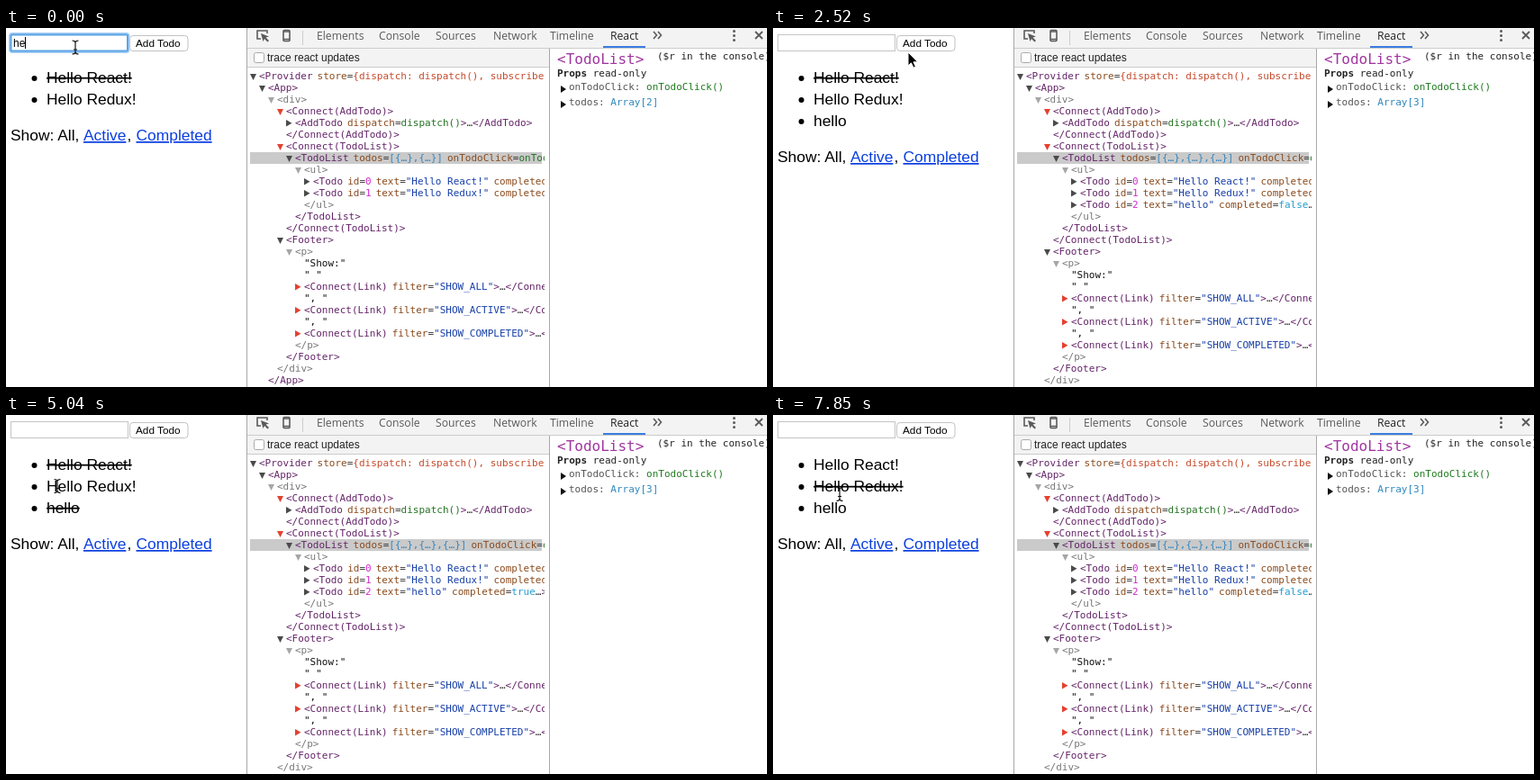
These frames come from a looping animation (845 px wide and 399 px high, 7.99 s). An HTML page:

```html
<!DOCTYPE html>
<html lang="en">
<head>
<meta charset="utf-8">
<title>Todo list with inspector</title>
<style>
  html, body { margin: 0; width: 100%; height: 100%; overflow: hidden; background: #fff; }
  svg { display: block; width: 100vw; height: 100vh; }
  text { white-space: pre; }
  .page { font: 17.4px "Liberation Sans", Arial, sans-serif; fill: #000; }
  .field { font: 12px "Liberation Sans", Arial, sans-serif; }
  .button { font: 11.8px "Liberation Sans", Arial, sans-serif; }
  .tab { font: 12.2px "Open Sans", "Noto Sans", sans-serif; fill: #5a5a5a; }
  .code { font: 11px "DejaVu Sans Mono", monospace; }
  .link { fill: #0b3fe0; text-decoration: underline; }
  .done { text-decoration: line-through; }
</style>
</head>
<body>
<svg id="stage" viewBox="0 0 845 399">
  <defs><clipPath id="treeClip"><rect x="268" y="44" width="330" height="355"/></clipPath></defs>
  <rect width="845" height="399" fill="#fff"/>

  <g id="page" class="page">
    <rect x="5.5" y="7.5" width="130" height="18" fill="#fff" stroke="#c4c4c4"/>
    <g id="focus">
      <rect x="5" y="7" width="130.5" height="19" rx="2" fill="none" stroke="#a9d0f5" stroke-width="4"/>
      <rect x="5.5" y="7.5" width="129.5" height="18" rx="1" fill="#fff" stroke="#5ba3e6" stroke-width="2"/>
      <path id="caret" d="M.5 10V23" stroke="#000"/>
    </g>
    <text id="typed" class="field" x="8" y="21"></text>
    <rect x="137.5" y="8.5" width="64.5" height="17" rx="3.5" fill="#fff" stroke="#c2c2c2"/>
    <text class="button" x="144" y="21">Add Todo</text>
    <g id="items"></g>
    <g id="filters">
      <text x="5" y="125">Show: All,</text>
      <text class="link" x="86" y="125">Active</text>
      <text x="134.5" y="125">,</text>
      <text class="link" x="144.5" y="125">Completed</text>
    </g>
  </g>

  <rect x="268" width="577" height="22" fill="#f3f3f3"/>
  <rect x="268" y="22" width="335" height="21" fill="#f3f3f3"/>
  <path d="M267.5 0V399M603.5 22V399" stroke="#a8a8a8"/>
  <path d="M268 22.5H845M268 43.5H603M329.5 3V19" stroke="#ccc"/>
  <g fill="none" stroke="#5a5a5a" stroke-width="1.6">
    <path d="M283 12H279V3H290V6"/>
    <rect x="308" y="2.5" width="7" height="12" rx="1"/>
    <path d="M308 4H315M308 12.5H315"/>
    <path d="M719 4L722.5 8L719 12M724 4L727.5 8L724 12"/>
    <path d="M832 4L840 12M840 4L832 12" stroke-width="1.8"/>
  </g>
  <path d="M283 6L292 9.5L288.5 10.5L292 14L290.5 15.5L287 12L285.5 15Z" fill="#5a5a5a"/>
  <g fill="#5a5a5a">
    <circle cx="808.5" cy="3.5" r="1.5"/><circle cx="808.5" cy="8.5" r="1.5"/><circle cx="808.5" cy="13.5" r="1.5"/>
  </g>
  <g id="tabs" class="tab"></g>
  <rect x="663" y="20" width="47" height="2" fill="#3b7de0"/>
  <rect x="275.5" y="27.5" width="11" height="11" rx="2" fill="#fff" stroke="#aaa"/>
  <text class="field" x="290" y="37" fill="#222">trace react updates</text>

  <g id="tree" class="code" clip-path="url(#treeClip)"></g>

  <g class="code" fill="#222">
    <text x="612" y="40" fill="#a0369f" style="font-size:16px">&lt;TodoList&gt;</text>
    <text x="723" y="35">($r in the console)</text>
    <text x="612" y="54"><tspan font-weight="bold">Props</tspan> read-only</text>
    <path d="M616 64L622 68L616 72ZM616 81L622 85L616 89Z" fill="#111"/>
    <text x="625" y="69" fill="#555">onTodoClick: <tspan fill="#1f7a1f">onTodoClick()</tspan></text>
    <text x="625" y="86" fill="#555">todos: <tspan id="count" fill="#2f87bd"></tspan></text>
  </g>

  <g id="ibeam" fill="none">
    <path id="beam" d="M-3.5 -7.5Q-.5 -7.5 0 -5.5Q.5 -7.5 3.5 -7.5M0 -6V6M-3.5 7.5Q-.5 7.5 0 5.5Q.5 7.5 3.5 7.5M-2 2.5H2" stroke="#111" stroke-width="1.2"/>
  </g>
  <path id="arrow" d="M0 0V15L3.4 11.8L6 17.2L8.4 16.1L6 10.8H10.8Z" fill="#000" stroke="#fff" stroke-width="1"/>
</svg>
<script>
const LOOP = 7990;
const $ = id => document.getElementById(id);

function add(parent, tag, attrs, content = '') {
  const node = document.createElementNS('http://www.w3.org/2000/svg', tag);
  for (const key in attrs) node.setAttribute(key, attrs[key]);
  node.textContent = content;
  return parent.appendChild(node);
}

const TABS = { Elements: 345, Console: 414, Sources: 477, Network: 541, Timeline: 604, React: 671 };
for (const name in TABS) {
  add($('tabs'), 'text', { x: TABS[name], y: 13, fill: name === 'React' ? '#222' : '#5a5a5a' }, name);
}

const items = ['Hello React!', 'Hello Redux!', 'hello'].map((label, i) => {
  const group = add($('items'), 'g', {});
  add(group, 'circle', { cx: 31.5, cy: 56 + 24 * i, r: 3 });
  return { group, text: add(group, 'text', { x: 45, y: 61 + 24 * i }, label) };
});

// Each row: nesting level, arrow (v open, > closed), source text.
function treeRows(count, helloDone) {
  const todo = (id, label, rest) => [6, '>', `<Todo id=${id} text="${label}" completed=${rest}`];
  const link = filter => [5, '>', `<Connect(Link) filter="${filter}">…</Connect(Link)>`];
  const todos = Array(count).fill('{…}').join();
  return [
    [0, 'v', '<Provider store={dispatch: dispatch(), subscribe: subscribe()'],
    [1, 'v', '<App>'],
    [2, 'v', '<div>'],
    [3, 'v', '<Connect(AddTodo)>'],
    [4, '>', '<AddTodo dispatch=dispatch()>…</AddTodo>'],
    [3, '', '</Connect(AddTodo)>'],
    [3, 'v', '<Connect(TodoList)>'],
    [4, 'v', `<TodoList todos=[${todos}] onTodoClick=onTodoClick()>`],
    [5, 'v', '<ul>'],
    todo(0, 'Hello React!', 'true'),
    todo(1, 'Hello Redux!', 'false'),
    ...(count > 2 ? [todo(2, 'hello', helloDone + '…>')] : []),
    [5, '', '</ul>'],
    [4, '', '</TodoList>'],
    [3, '', '</Connect(TodoList)>'],
    [3, 'v', '<Footer>'],
    [4, 'v', '<p>'],
    [5, '', '"Show:"'],
    [5, '', '" "'],
    link('SHOW_ALL'),
    [5, '', '", "'],
    link('SHOW_ACTIVE'),
    [5, '', '", "'],
    link('SHOW_COMPLETED'),
    [4, '', '</p>'],
    [3, '', '</Footer>'],
    [2, '', '</div>'],
    [1, '', '</App>']
  ];
}

const TOKEN = /(?<tag><\/?[\w()]+>?|>)|(?<string>"[^"]*")|(?<object>\{.*)|(?<array>\[.*?\])|(?<func>\w+\(\))|(?<attr>\w+(?==))|(?<bool>true|false)|(?<number>\d)|(?<gap> )|(?<other>.)/g;
const COLORS = {
  tag: '#642468', string: '#173fa8', object: '#c44a2c', array: '#3585bd', func: '#237323',
  attr: '#8a4a1c', bool: '#249bd0', number: '#d42bd0', other: '#333'
};

function drawTree(count, helloDone) {
  const tree = $('tree');
  tree.textContent = '';
  add(tree, 'rect', { x: 271, y: 138, width: 324, height: 13, fill: '#cacaca' });
  treeRows(count, helloDone).forEach(([level, arrow, source], i) => {
    const x = 281 + 10 * level, y = 53 + 13 * i;
    const native = /^<\/?(div|ul|p)>/.test(source);
    if (arrow) {
      const shape = arrow === 'v' ? `M${x - 10} ${y - 2}h7l-3.5 7z` : `M${x - 10} ${y - 3}v7.5l6.5 -3.75z`;
      const fill = source.startsWith('<Connect') ? '#e5402f' : native ? '#a6a6a6' : '#4a4a4a';
      add(tree, 'path', { d: shape, fill });
    }
    const line = add(tree, 'text', { x, y: y + 4 });
    let dx = 0;
    for (const { 0: piece, groups } of source.matchAll(TOKEN)) {
      const kind = Object.keys(groups).find(key => groups[key] !== undefined);
      if (kind === 'gap') { dx = 5; continue; }
      const plain = source[0] === '"';
      const fill = plain ? '#111' : native ? '#777' : COLORS[kind];
      add(line, 'tspan', { dx, fill }, piece);
      dx = 0;
    }
  });
}

// time, x, y, arrow pointer?
const POINTER = [
  [0, 77, 21.5], [1340, 101, 18], [1480, 124, 18], [1630, 146, 17, 1], [1780, 158, 17, 1],
  [2520, 150, 27, 1], [2670, 122, 50, 1], [2810, 98, 73], [2960, 92, 78],
  [3560, 83, 87], [3710, 68, 102], [3860, 62, 104],
  [4440, 62, 98], [4590, 60, 88], [4740, 58, 81], [4890, 57, 79],
  [5190, 58, 77], [5340, 61, 69], [5490, 65, 59], [5630, 67, 56],
  [6070, 68, 70], [6220, 70, 91], [6370, 71, 101],
  [7110, 72, 98], [7260, 73, 92], [7410, 74, 88]
];
const TYPING = [[0, 'he'], [450, 'hel'], [590, 'hell'], [1040, 'hello'], [2080, '']];

const latest = (keys, t) => keys.findLast(key => key[0] <= t);
const within = (t, from, to) => t >= from && t < to;
const show = (node, visible) => node.setAttribute('visibility', visible ? 'visible' : 'hidden');

let treeKey = '';

function render(t) {
  const typed = $('typed');
  typed.textContent = latest(TYPING, t)[1];
  show($('focus'), t < 1930);
  $('caret').setAttribute('transform', `translate(${Math.round(8 + typed.getComputedTextLength())} 0)`);

  const added = t >= 2080;
  const done = [t < 5920, within(t, 3410, 5040) || t >= 7850, within(t, 4150, 6820)];
  items.forEach(({ text }, i) => text.setAttribute('class', done[i] ? 'done' : ''));
  show(items[2].group, added);
  $('filters').setAttribute('transform', `translate(0 ${added ? 24 : 0})`);

  const count = t < 2220 ? 2 : 3, helloDone = within(t, 4300, 6970);
  const key = count + String(helloDone);
  if (key !== treeKey) {
    treeKey = key;
    drawTree(count, helloDone);
    $('count').textContent = `Array[${count}]`;
  }

  const [, x, y, isArrow] = latest(POINTER, t);
  for (const id of ['ibeam', 'arrow']) {
    $(id).setAttribute('transform', `translate(${x} ${y})`);
    show($(id), (id === 'arrow') === Boolean(isArrow));
  }
}

const start = performance.now();
function frame() {
  render((performance.now() - start) % LOOP);
  requestAnimationFrame(frame);
}
frame();
</script>
</body>
</html>
```
